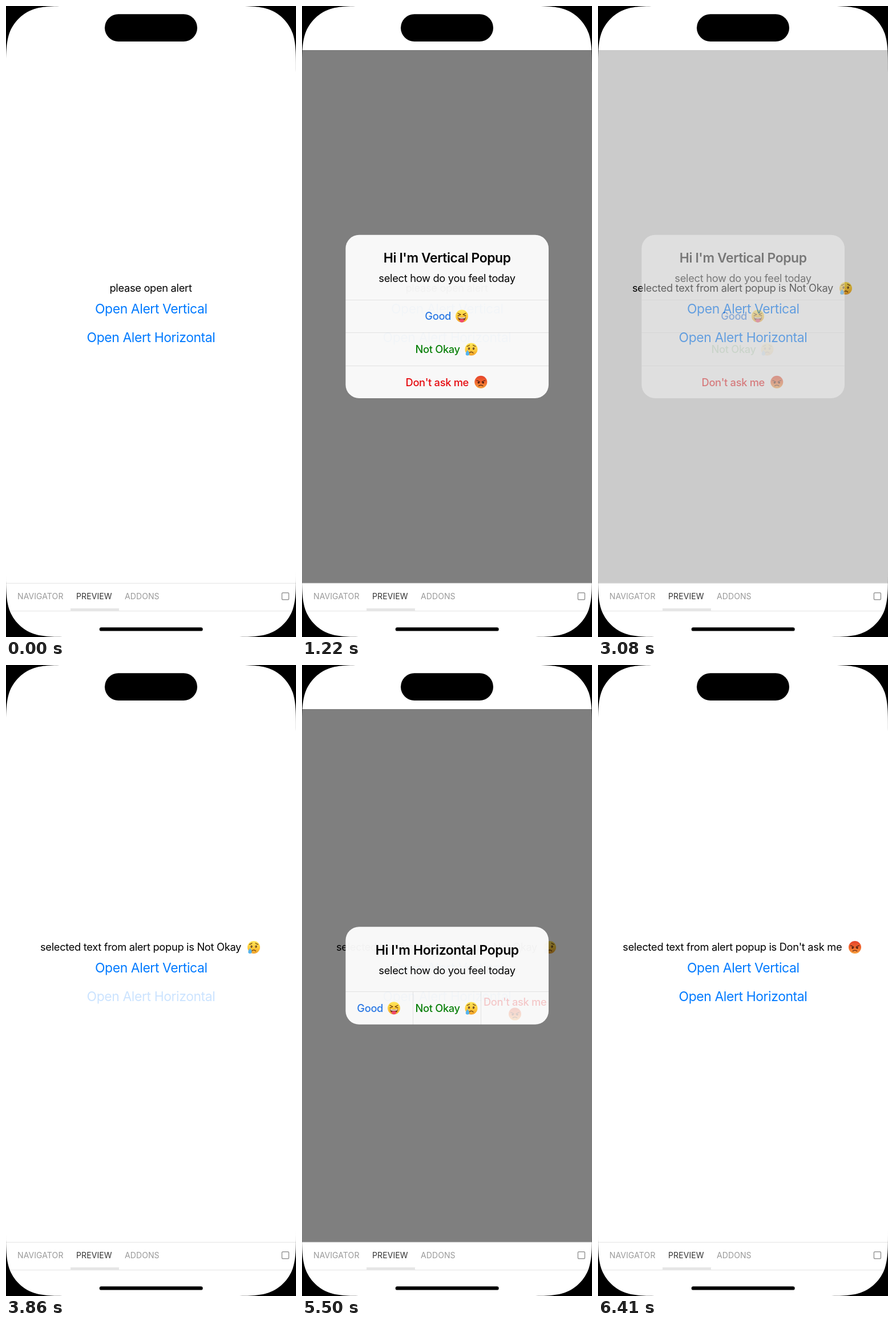
Animation, 508 px wide and 1102 px high, one loop 6.43 s. Source, as an HTML page:

```html
<!DOCTYPE html>
<html lang="en">
<head>
<meta charset="utf-8">
<title>Alert popups</title>
<style>
  html, body { margin: 0; width: 100%; height: 100%; overflow: hidden; background: #000; }
  svg { display: block; width: 100vw; height: 100vh; }
  text { font: 400 18.3px Inter, Roboto, sans-serif; letter-spacing: -.017em; }
  .mid { text-anchor: middle; }
  .link { font-size: 22.9px; fill: #007aff; }
  .title { font-size: 22.9px; font-weight: 600; }
  .choice text { font-weight: 500; }
  .good { fill: #2a78e4; }
  .sad { fill: #0a800a; }
  .angry { fill: #e60a0f; }
  .tabs text { font-size: 14px; letter-spacing: .1px; fill: #999; }
  .tabs .active { fill: #333; }
  .card { fill: #fff; fill-opacity: .95; }
  .rule { fill: none; stroke: #000; stroke-opacity: .09; }
  .brow { fill: none; stroke: #6b3a0c; stroke-width: 1.2; stroke-linecap: round; stroke-linejoin: round; }

  /* Every change is a hard cut, so all tracks hold their value. */
  .track { animation: 6430ms step-end infinite; }
  .first-modal { opacity: 0; animation-name: first-modal; }
  .second-modal { opacity: 0; animation-name: second-modal; }
  .open-first { animation-name: open-first; }
  .open-second { animation-name: open-second; }
  .pick-sad { animation-name: pick-sad; }
  .pick-angry { animation-name: pick-angry; }
  .prompt { animation-name: prompt; }
  .result-sad { opacity: 0; animation-name: result-sad; }
  .result-angry { opacity: 0; animation-name: result-angry; }

  @keyframes first-modal {
    0% { opacity: 0; }
    15.55% { opacity: .58; } 16.79% { opacity: .85; } 17.88% { opacity: .96; } 18.97% { opacity: 1; }
    47.89% { opacity: .41; } 48.98% { opacity: .15; } 50.07% { opacity: .04; }
    51.32%, 100% { opacity: 0; }
  }
  @keyframes second-modal {
    0% { opacity: 0; }
    61.27% { opacity: .58; } 62.36% { opacity: .85; } 63.45% { opacity: .96; } 64.69% { opacity: 1; }
    96.26% { opacity: .41; } 97.35% { opacity: .15; } 98.44% { opacity: .04; }
    99.68%, 100% { opacity: 0; }
  }
  @keyframes open-first {
    0% { opacity: 1; } 12.28% { opacity: .2; }
    15.55% { opacity: .36; } 16.79% { opacity: .8; } 17.88%, 100% { opacity: 1; }
  }
  @keyframes open-second {
    0% { opacity: 1; } 57.54% { opacity: .2; }
    61.27% { opacity: .36; } 62.36% { opacity: .8; } 63.45%, 100% { opacity: 1; }
  }
  @keyframes pick-sad { 0% { opacity: 1; } 41.05%, 100% { opacity: .2; } }
  @keyframes pick-angry { 0% { opacity: 1; } 85.53%, 100% { opacity: .2; } }
  @keyframes prompt { 0% { opacity: 1; } 46.65%, 100% { opacity: 0; } }
  @keyframes result-sad { 0% { opacity: 0; } 46.65% { opacity: 1; } 95.02%, 100% { opacity: 0; } }
  @keyframes result-angry { 0% { opacity: 0; } 95.02%, 100% { opacity: 1; } }
</style>
</head>
<body>
<svg viewBox="0 0 508 1102" preserveAspectRatio="none">
  <defs>
    <linearGradient id="yellow" x2="0" y2="1">
      <stop stop-color="#ffe65a"/><stop offset=".55" stop-color="#fdcb3c"/><stop offset="1" stop-color="#f0a02c"/>
    </linearGradient>
    <linearGradient id="red" x2="0" y2="1">
      <stop stop-color="#e5442c"/><stop offset=".5" stop-color="#f0652e"/><stop offset="1" stop-color="#f7a03c"/>
    </linearGradient>

    <g id="tongue">
      <circle r="11" fill="url(#yellow)"/>
      <path class="brow" d="M-7-5l5 2.4-5 2.2M7-5l-5 2.4 5 2.2"/>
      <path d="M-7 1.4Q0 3.2 7 1.4Q6.4 8.6 0 8.8Q-6.4 8.6-7 1.4Z" fill="#69330f"/>
      <path d="M-6.2 1.9Q0 3.4 6.2 1.9L5.8 3.6Q0 4.8-5.8 3.6Z" fill="#fff"/>
      <path d="M-3.8 6Q0 4 3.8 6V8Q3.4 11 0 11T-3.8 8Z" fill="#f0486c"/>
    </g>
    <g id="tear">
      <circle r="11" fill="url(#yellow)"/>
      <g fill="#5b3410"><ellipse cx="-4" cy="-1.3" rx="1.6" ry="2.1"/><ellipse cx="4" cy="-1.3" rx="1.6" ry="2.1"/></g>
      <g fill="#fff"><circle cx="-4.3" cy="-2" r=".6"/><circle cx="3.7" cy="-2" r=".6"/></g>
      <path class="brow" d="M-7.4-5.2Q-4.6-5.6-3-7.4M7.4-5.2Q4.6-5.6 3-7.4M-3.6 6.6Q0 2.8 3.6 6.6"/>
      <path d="M-6.6 1.6Q-3.2 6-3.4 7.8A3.2 3.2 0 0 1-9.8 7.8Q-9.6 5.6-6.6 1.6Z" fill="#55b4ee"/>
    </g>
    <g id="rage">
      <circle r="11" fill="url(#red)"/>
      <g fill="#4a1d10"><circle cx="-4" cy="1" r="1.7"/><circle cx="4" cy="1" r="1.7"/></g>
      <path class="brow" d="M-7.4-2.8Q-4-2.4-1.8-.2M7.4-2.8Q4-2.4 1.8-.2M-3.7 6.7Q0 3.8 3.7 6.7" style="stroke:#4a1d10"/>
    </g>

    <path id="corner" d="M0 0H116.2C82.7 0 66 0 48 5.7C28.3 12.8 12.8 28.3 5.7 48C0 66 0 82.7 0 116.2Z"/>
  </defs>

  <rect width="508" height="1102" fill="#fff"/>

  <text class="mid track prompt" x="253.5" y="499.3">please open alert</text>
  <g class="track result-sad">
    <text x="60" y="499.3">selected text from alert popup is Not Okay</text>
    <use href="#tear" x="434" y="493"/>
  </g>
  <g class="track result-angry">
    <text x="43.3" y="499.3">selected text from alert popup is Don't ask me</text>
    <use href="#rage" x="450" y="493"/>
  </g>
  <text class="mid link track open-first" x="254.3" y="537.3">Open Alert Vertical</text>
  <text class="mid link track open-second" x="254" y="587">Open Alert Horizontal</text>

  <rect class="track first-modal" y="77" width="508" height="931" fill-opacity=".5"/>
  <g class="track first-modal">
    <rect class="card" x="76.4" y="399.8" width="355.6" height="285.2" rx="23.6"/>
    <path class="rule" d="M76.5 513.5H432M76.5 570.5H432M76.5 628.5H432"/>
    <text class="mid title" x="254.2" y="448.3">Hi I'm Vertical Popup</text>
    <text class="mid" x="254" y="482">select how do you feel today</text>
    <g class="choice">
      <text class="good" x="215.3" y="548.3">Good</text>
      <use href="#tongue" x="280" y="541.5"/>
    </g>
    <g class="choice track pick-sad">
      <text class="sad" x="198.5" y="606">Not Okay</text>
      <use href="#tear" x="296.5" y="599.5"/>
    </g>
    <g class="choice">
      <text class="angry" x="181.5" y="663.5">Don't ask me</text>
      <use href="#rage" x="313.3" y="656.8"/>
    </g>
  </g>

  <rect class="track second-modal" y="77" width="508" height="931" fill-opacity=".5"/>
  <g class="track second-modal">
    <rect class="card" x="76.4" y="457.2" width="355.6" height="170.6" rx="23.6"/>
    <path class="rule" d="M76.5 570.5H432M194.5 571V628M313.5 571V628"/>
    <text class="mid title" x="254.2" y="505.8">Hi I'm Horizontal Popup</text>
    <text class="mid" x="254" y="539.5">select how do you feel today</text>
    <g class="choice">
      <text class="good" x="96.3" y="606">Good</text>
      <use href="#tongue" x="161" y="599.3"/>
    </g>
    <g class="choice">
      <text class="sad" x="198.5" y="606">Not Okay</text>
      <use href="#tear" x="296.5" y="599.5"/>
    </g>
    <g class="choice track pick-angry">
      <text class="angry mid" x="373.2" y="594.7">Don't ask me</text>
      <use href="#rage" x="373" y="609.6"/>
    </g>
  </g>

  <g class="tabs">
    <rect y="1008" width="508" height="94" fill="#fff"/>
    <path d="M0 1008.2H508M0 1056.7H508" stroke="#e2e2e2"/>
    <rect x="113" y="1052" width="85" height="4.7" fill="#e6e6e6"/>
    <text x="20" y="1036">NAVIGATOR</text>
    <text class="active" x="123" y="1036">PREVIEW</text>
    <text x="208" y="1036">ADDONS</text>
    <rect x="483.4" y="1024.8" width="12" height="12" rx="1.8" fill="none" stroke="#999" stroke-width="1.5"/>
  </g>

  <rect x="173" y="14.3" width="162" height="47.7" rx="23.85"/>
  <rect x="163.7" y="1085.2" width="181" height="6.4" rx="3.2"/>
  <use href="#corner"/>
  <use href="#corner" transform="translate(508) scale(-1 1)"/>
  <use href="#corner" transform="translate(0 1102) scale(1 -1)"/>
  <use href="#corner" transform="translate(508 1102) scale(-1)"/>
</svg>
</body>
</html>
```
